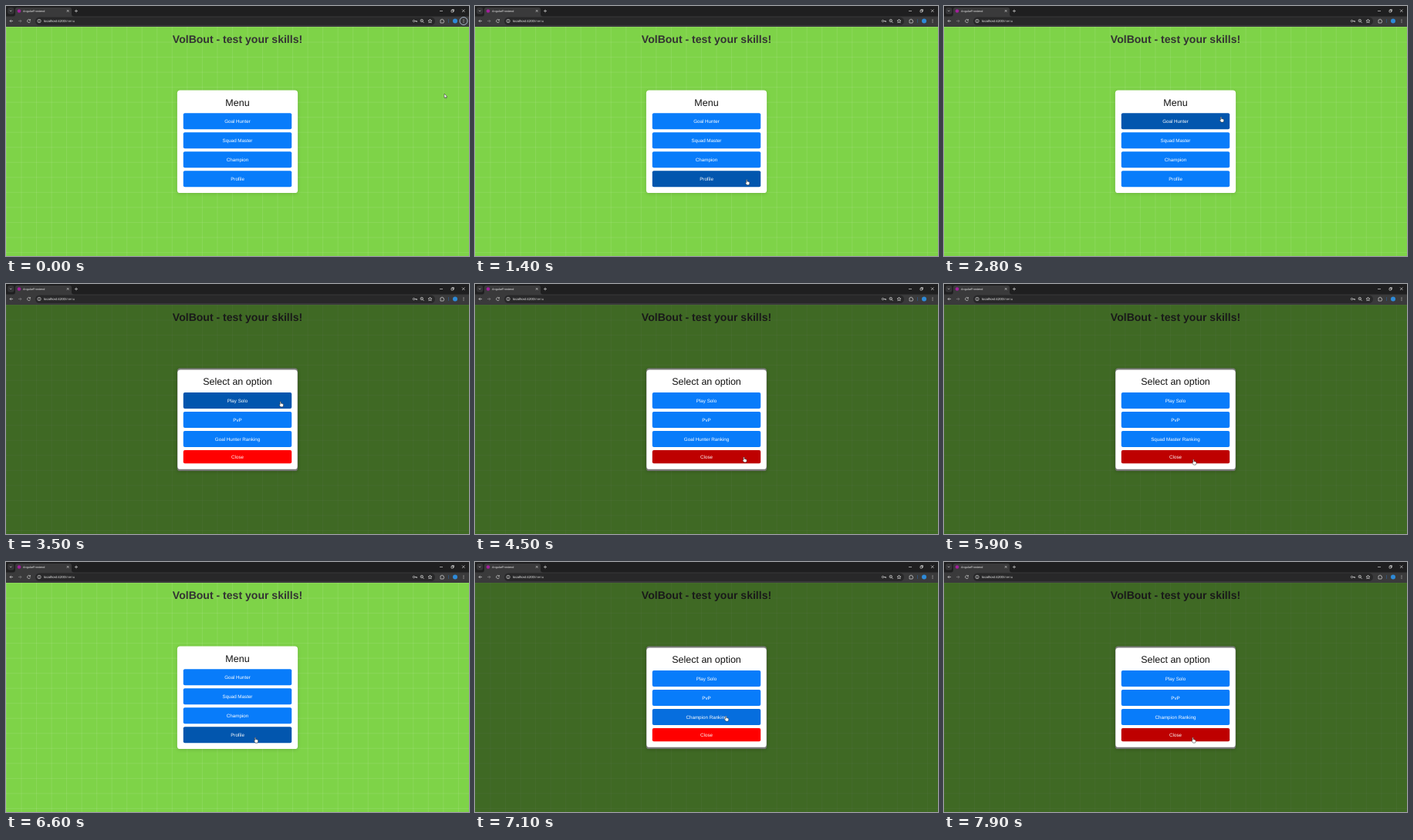
Animation, 600 px wide and 325 px high, one loop 8000 ms. Source, as an HTML page:

```html
<!DOCTYPE html>
<html lang="en">
<head>
<meta charset="utf-8">
<title>Quiz menu</title>
<style>
  html, body { margin: 0; width: 100%; height: 100%; overflow: hidden; background: #7ed348; }
  svg { display: block; width: 600px; height: 325px; font-family: "Liberation Sans", Arial, sans-serif; text-rendering: geometricPrecision; }
  .icons { fill: none; stroke: #d0d0d0; stroke-width: .7; }
  .mid { text-anchor: middle; }
  .panel { filter: drop-shadow(0 1.5px 2px rgba(0, 0, 0, .14)); }
</style>
</head>
<body>
<svg viewBox="0 0 600 325">
  <defs>
    <pattern id="grid" y="27" width="19.53" height="19.53" patternUnits="userSpaceOnUse">
      <path d="M0 .4H19.53M.4 0V19.53" stroke="#fff" stroke-opacity=".13" stroke-width=".8"/>
    </pattern>
  </defs>

  <rect y="27" width="600" height="298" fill="#7ed348"/>
  <rect y="27" width="600" height="298" fill="url(#grid)"/>
  <text class="mid" x="300" y="48" font-size="14.06" font-weight="700" fill="#333">VolBout - test your skills!</text>
  <g id="menu"></g>
  <g id="modal"></g>

  <rect width="600" height="27" fill="#1f1f20"/>
  <path d="M9 13.5Q12 13.5 12 10.5V4.5Q12 2 14.5 2H82.500Q85 2 85 4.500V10.500Q85 13.500 88 13.500H600V27H0V13.500Z" fill="#3a3a3b"/>
  <rect x="38" y="14.500" width="518" height="10.500" rx="5.250" fill="#282829"/>
  <rect x="2" y="2" width="8.500" height="8.500" rx="2.800" fill="#343436"/>
  <circle cx="17" cy="6.500" r="2.300" fill="#a4209c"/>
  <text x="22" y="8" font-size="3.800" fill="#e4e4e4">AngularFrontend</text>
  <text x="49" y="21.200" font-size="4.350" fill="#eee">localhost:4200<tspan fill="#bbb">/menu</tspan></text>
  <g class="icons">
    <path d="M5 5.700L6.200 7L7.400 5.700M78.800 5L81.600 7.800M81.600 5L78.800 7.800M89 6.500H93M91 4.500V8.500"/>
    <path d="M562 6.500H566M577 5.500H579.500V8H577ZM578 5.500V4.500H580.500V7H579.500M591 4.500L594.500 8M594.500 4.500L591 8"/>
    <path d="M9 19.500H5M6.800 17.700L5 19.500L6.800 21.300"/>
    <path d="M16 19.500H20M18.200 17.700L20 19.500L18.200 21.300" stroke="#858585"/>
    <path d="M31.200 18.300A2 2 0 1 0 31.500 20.200M31.500 17.200V18.700H30"/>
    <circle cx="43" cy="19.500" r="2.200"/><path d="M43 19.200V20.800M43 18V18.600"/>
    <circle cx="528.500" cy="19.500" r="1.200"/><path d="M529.700 19.500H532.500V21M531.200 19.500V20.700"/>
    <circle cx="538.800" cy="19" r="1.700"/><path d="M540 20.200L541.700 22M538 19H539.600"/>
    <path d="M549.500 17L550.200 18.800L552 18.900L550.600 20.100L551.100 21.900L549.500 20.900L547.900 21.900L548.400 20.100L547 18.900L548.800 18.800Z"/>
    <path d="M563 18H564.200A.9 .9 0 0 1 566 18H567V19.300A.8 .8 0 0 1 567 20.900V22H563Z"/>
    <path d="M573.500 17V22" stroke="#2f5c8f"/>
  </g>
  <circle cx="582" cy="19.500" r="3" fill="#2e8ad8"/>
  <g fill="#ddd"><circle cx="593" cy="17.700" r=".5"/><circle cx="593" cy="19.500" r=".5"/><circle cx="593" cy="21.300" r=".5"/></g>
  <circle id="ring" cx="593" cy="19.500" r="5" fill="none" stroke="#c4d8f0" stroke-width=".8"/>

  <g id="cursor" stroke="#222" stroke-width=".5" stroke-linejoin="round" fill="#fff">
    <path id="arrow" d="M0 0V5.500L1.300 4.400L2.100 6.200L3 5.800L2.200 4.100H3.900Z"/>
    <path id="hand" d="M-.6 .6Q0 -.5 .6 .6V2.700Q1.300 2.200 1.700 2.900Q2.400 2.500 2.800 3.200Q3.700 3 3.700 4V5.300L3 7.100H.1L-1.700 4.400Q-1.600 3.500 -.6 4.200Z"/>
  </g>
</svg>

<script>
const LOOP = 8000, FADE = 200, STEPS = 8;
const $ = id => document.getElementById(id);
const BLUE = [[8, 124, 250], [2, 86, 174]];
const RED = [[255, 0, 0], [190, 0, 0]];

// [time, dialog subject]; an empty subject means the menu
const scenes = [[0, ""], [3000, "Goal Hunter"], [4700, ""], [5250, "Squad Master"], [6400, ""], [7050, "Champion"]];

// [time, x, y] of the pointer tip
const path = [
  [0, 568, 114], [199, 568, 114], [200, 563, 114], [450, 563, 114],
  [800, 345, 160], [1150, 350, 236], [1350, 352, 227], [2000, 359, 144],
  [2800, 359, 144], [3400, 356, 150], [4300, 348.5, 225], [4700, 348.5, 224.5],
  [5050, 326.3, 178.5], [5250, 326.3, 178.5], [5850, 323.3, 228], [6600, 323, 228],
  [6950, 325, 200], [7100, 325, 200], [7650, 322.5, 228], [8000, 322.5, 228]
];

const button = (label, y, h = 21.1, colors = BLUE) => ({ label, y, h, colors });
const menuButtons = ["Goal Hunter", "Squad Master", "Champion", "Profile"]
  .map((label, i) => button(label, 139.2 + i * 25));
const modalButtons = ["Play Solo", "PvP", "Ranking"].map((label, i) => button(label, 141 + i * 25));
modalButtons.push(button("Close", 216, 17.2, RED));

function build(group, heading, y, x, h, buttons) {
  group.innerHTML += `<rect class="panel" x="${x}" y="${y}" width="${600 - 2 * x}" height="${h}" rx="3.9" fill="#fff"/>
    <text class="mid" x="300" y="${y + 20}" font-size="12.5" fill="#111">${heading}</text>` +
    buttons.map(b => `<rect class="btn" x="229.8" y="${b.y}" width="140.4" height="${b.h}" rx="2"/>
    <text class="mid label" x="300" y="${b.y + b.h / 2 + 2.25}" font-size="6.25" fill="#fff">${b.label}</text>`).join("");
  group.querySelectorAll(".btn").forEach((el, i) => buttons[i].el = el);
}
$("modal").innerHTML = '<rect y="27" width="600" height="298" fill="#000" fill-opacity=".5"/>';
build($("menu"), "Menu", 109.6, 221.9, 133.5, menuButtons);
build($("modal"), "Select an option", 111.4, 222.3, 129.4, modalButtons);
const ranking = $("modal").querySelectorAll(".label")[2];

const sceneAt = t => scenes.findLast(s => s[0] <= Math.max(t, 0));

function pointerAt(t) {
  t = Math.max(t, 0);
  const i = path.findLastIndex(p => p[0] <= t);
  const a = path[i], b = path[i + 1] || a;
  const u = b === a ? 0 : (t - a[0]) / (b[0] - a[0]);
  const e = u * u * (3 - 2 * u);
  return [a[1] + (b[1] - a[1]) * e, a[2] + (b[2] - a[2]) * e];
}

const over = (b, [x, y]) => x > 229.8 && x < 370.2 && y > b.y && y < b.y + b.h;

// Share of the last FADE ms spent over the button in the current scene
function hover(b, t, scene) {
  let hits = 0;
  for (let k = 0; k < STEPS; k++) {
    const past = t - k * FADE / STEPS;
    if (sceneAt(past) === scene && over(b, pointerAt(past))) hits++;
  }
  return hits / STEPS;
}

function draw(now) {
  const t = now % LOOP;
  const scene = sceneAt(t), subject = scene[1];
  const buttons = subject ? modalButtons : menuButtons;
  const tip = pointerAt(t);

  $("modal").style.display = subject ? "" : "none";
  ranking.textContent = subject + " Ranking";
  for (const b of buttons) {
    const k = hover(b, t, scene);
    b.el.setAttribute("fill", `rgb(${b.colors[0].map((c, i) => Math.round(c + (b.colors[1][i] - c) * k))})`);
  }

  const hand = buttons.some(b => over(b, tip));
  $("hand").style.display = hand ? "" : "none";
  $("arrow").style.display = hand ? "none" : "";
  $("cursor").setAttribute("transform", `translate(${tip})`);
  $("ring").style.display = t < 900 ? "" : "none";
  requestAnimationFrame(draw);
}
draw(performance.now());
</script>
</body>
</html>
```
